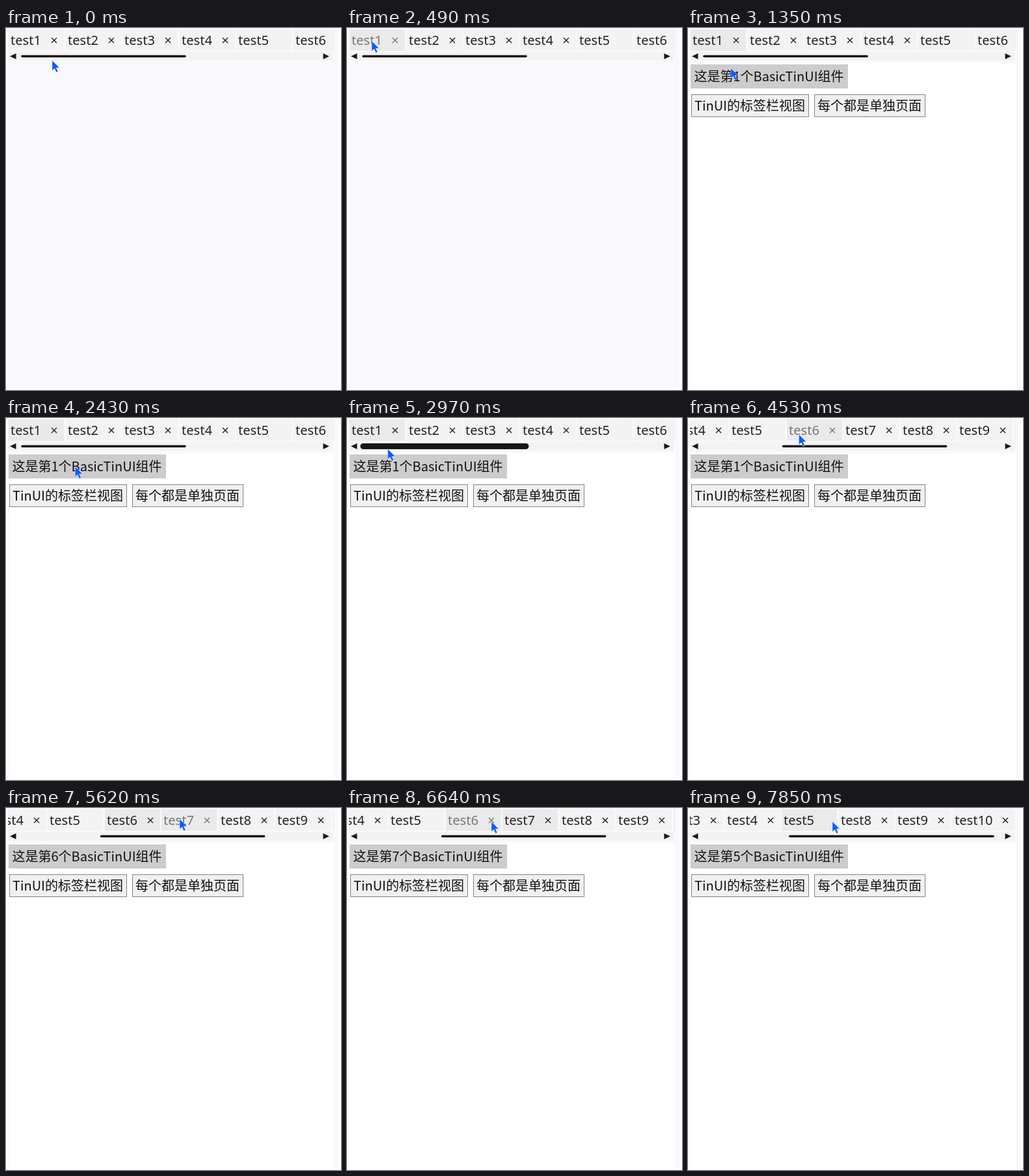
Animation of 515x557 px, one loop 8000 ms. Source, as an HTML page with a canvas:

```html
<!DOCTYPE html>
<html lang="zh-CN">
<head>
<meta charset="utf-8">
<style>
html, body { margin: 0; width: 100%; height: 100%; overflow: hidden; background: #fff; }
canvas { display: block; }
</style>
</head>
<body>
<canvas id="stage" width="515" height="557"></canvas>
<script>
const ctx = document.getElementById('stage').getContext('2d');
const LOOP = 8000;
const STEP = 67;
const TAB_FONT = '20.1px "Noto Sans", "Open Sans", sans-serif';
const PAGE_FONT = '20px "Noto Sans CJK SC", "Noto Sans CJK", sans-serif';

const TAB_COUNT = 10;
const PITCH = 87.5;
const WIDE_EXTRA = 11;
const VIEW = 502;
const TRACK = { x: 23, width: 447, y: 43.5 };
const DRAG_END = 290;
const DRAG_RATIO = 2.385;

// Each move eases from where the pointer rests; "bend" curves its path.
const rest = { x: 71, y: 50 };
const drag = { start: 3600, end: 4190, x: 177, y: 43, power: 2.7 };
const moves = [
  { start: 70, end: 490, x: 38, y: 20, power: 1.5 },
  { start: 1350, end: 1710, x: 113, y: 81, power: 3, bend: { x: 68, y: 84 } },
  { start: 2430, end: 3180, x: 55, y: 45, power: 1.5, bend: { x: 86, y: 55 } },
  drag,
  { start: 4460, end: 4680, x: 167, y: 16, power: 1.5 },
  { start: 5280, end: 5620, x: 267, y: 17, power: 1.5 },
  { start: 6290, end: 6640, x: 222, y: 21, power: 1.5 }
];
const clicks = [
  { at: 890, open: 1 },
  { at: 1960 },
  { at: 3380, hold: 810 },
  { at: 4870, open: 6 },
  { at: 5820, open: 7 },
  { at: 6970, close: 6 },
  { at: 7300, close: 7, open: 5, hold: 550 }
];

const within = (v, a, b) => v >= a && v < b;
const easeOut = (p, power) => 1 - (1 - p) ** power;

function progress(move, t) {
  if (t < move.start) return 0;
  const duration = move.end - move.start;
  const intervals = Math.round(duration / STEP);
  const step = Math.floor((t - move.start) / duration * intervals + 0.1);
  return Math.min(1, (step + 1) / (intervals + 1));
}

function pointerAt(t) {
  const index = moves.filter(m => m.start <= t).length - 1;
  if (index < 0) return rest;
  const from = moves[index - 1] || rest;
  const to = moves[index];
  const p = easeOut(progress(to, t), to.power);
  const along = axis => {
    const middle = to.bend ? to.bend[axis] : (from[axis] + to[axis]) / 2;
    return (1 - p) ** 2 * from[axis] + 2 * p * (1 - p) * middle + p * p * to[axis];
  };
  return { x: along('x'), y: along('y') };
}

function stateAt(t) {
  const { x, y } = pointerAt(t);
  const past = clicks.filter(c => c.at <= t);
  const closed = past.filter(c => c.close).map(c => c.close);
  const opened = past.filter(c => c.open).pop();
  const last = past[past.length - 1];

  const total = (TAB_COUNT - closed.length) * PITCH + WIDE_EXTRA + 1;
  const dragged = DRAG_END * easeOut(progress(drag, t), 2.3);
  const scroll = closed.length ? Math.min(dragged, total - VIEW) : dragged;
  const ratio = closed.length ? total / TRACK.width : DRAG_RATIO;
  const left = TRACK.x + scroll / ratio;
  const right = left + TRACK.width * VIEW / total;

  const onBar = within(y, 38, 49.5) && within(x, left - 3, right + 3);
  const onButton = p => within(p.x, 4, 246) && within(p.y, 56, 93);
  return {
    x, y, scroll, left, right, closed,
    page: opened ? opened.open : 0,
    wide: onBar || within(t, 3380, 4460),
    hot: t < 1960 && onButton(pointerAt(t - STEP)),
    pressed: Boolean(last) && t < last.at + (last.hold || 205)
  };
}

function rect(x, y, w, h, color) {
  ctx.fillStyle = color;
  ctx.fillRect(x, y, w, h);
}

function outline(x, y, w, h, color) {
  ctx.strokeStyle = color;
  ctx.lineWidth = 1;
  ctx.strokeRect(x + 0.5, y + 0.5, w - 1, h - 1);
}

function write(text, x, y, font, color) {
  ctx.font = font;
  ctx.fillStyle = color;
  ctx.fillText(text, x, y);
}

function line(x1, y1, x2, y2, width, color, cap = 'butt') {
  ctx.beginPath();
  ctx.moveTo(x1, y1);
  ctx.lineTo(x2, y2);
  ctx.lineWidth = width;
  ctx.strokeStyle = color;
  ctx.lineCap = cap;
  ctx.stroke();
}

function polygon(points, color) {
  ctx.beginPath();
  points.forEach(p => ctx.lineTo(...p));
  ctx.closePath();
  ctx.fillStyle = color;
  ctx.fill();
}

function drawCross(x, y, color) {
  const r = 4;
  line(x - r, y - r, x + r, y + r, 1.4, color);
  line(x - r, y + r, x + r, y - r, 1.4, color);
}

function drawTabs(s) {
  ctx.save();
  ctx.beginPath();
  ctx.rect(3, 0, 502, 36);
  ctx.clip();
  let edge = 4 - s.scroll;
  for (let n = 1; n <= TAB_COUNT; n++) {
    if (s.closed.includes(n)) continue;
    const extra = n === TAB_COUNT ? WIDE_EXTRA : 0;
    const x = Math.round(edge);
    const width = 85 + extra;
    const selected = n === s.page;
    const hover = !selected && within(s.x, x, x + width) && within(s.y, 2, 35);
    const color = hover ? '#787878' : '#242424';
    rect(x, 2, width, 33, selected || hover ? '#eaeaea' : '#f3f3f3');
    write('test' + n, x + 3, 25.5, TAB_FONT, color);
    if (n !== 5) drawCross(x + 70 + extra, 19, color);
    edge += PITCH + extra;
  }
  ctx.restore();
}

function drawArrow(tip, base) {
  polygon([[tip, TRACK.y], [base, TRACK.y - 4.5], [base, TRACK.y + 4.5]], '#1a1a1a');
}

function drawScrollbar(s) {
  rect(4, 37, 498, 13, '#f3f3f3');
  drawArrow(6, 15.5);
  drawArrow(497, 487.5);
  line(s.left + 2, TRACK.y, s.right - 1, TRACK.y, s.wide ? 9 : 3.6, '#1a1616', 'round');
}

function drawLabel(text, x, width) {
  rect(x, 102, width, 35, '#f0f0f0');
  outline(x, 102, width, 35, '#858585');
  write(text, x + 5, 127, PAGE_FONT, '#111');
}

function drawPage(s) {
  rect(4, 54, 500, 500, '#fff');
  rect(4, 56, 242, 37, '#ccc');
  if (s.hot) outline(4, 56, 242, 37, '#7a7a7a');
  write(`这是第${s.page}个BasicTinUI组件`, 9.5, 82, PAGE_FONT, '#111');
  drawLabel('TinUI的标签栏视图', 5, 181);
  drawLabel('每个都是单独页面', 194, 171);
}

function drawPointer(s) {
  if (s.pressed) {
    ctx.beginPath();
    ctx.arc(s.x, s.y, 15, 0, Math.PI * 2);
    ctx.fillStyle = 'rgba(240,240,0,.58)';
    ctx.fill();
  }
  ctx.save();
  ctx.translate(s.x, s.y);
  polygon([[0, 0], [0, 15.5], [3.6, 12.3], [6.4, 18.3], [9, 17], [6.3, 11.3], [11, 11]],
    s.pressed ? '#4f8fa8' : '#0a5cff');
  ctx.lineWidth = 0.7;
  ctx.strokeStyle = 'rgba(255,255,255,.6)';
  ctx.stroke();
  ctx.restore();
}

function draw(t) {
  const s = stateAt(t);
  rect(0, 0, 515, 557, '#fff');
  rect(2, 0, 509, 554, '#f9f9fc');
  drawTabs(s);
  drawScrollbar(s);
  if (s.page) drawPage(s);
  drawPointer(s);
}

function tick() {
  draw(performance.now() % LOOP);
  requestAnimationFrame(tick);
}
tick();
</script>
</body>
</html>
```
